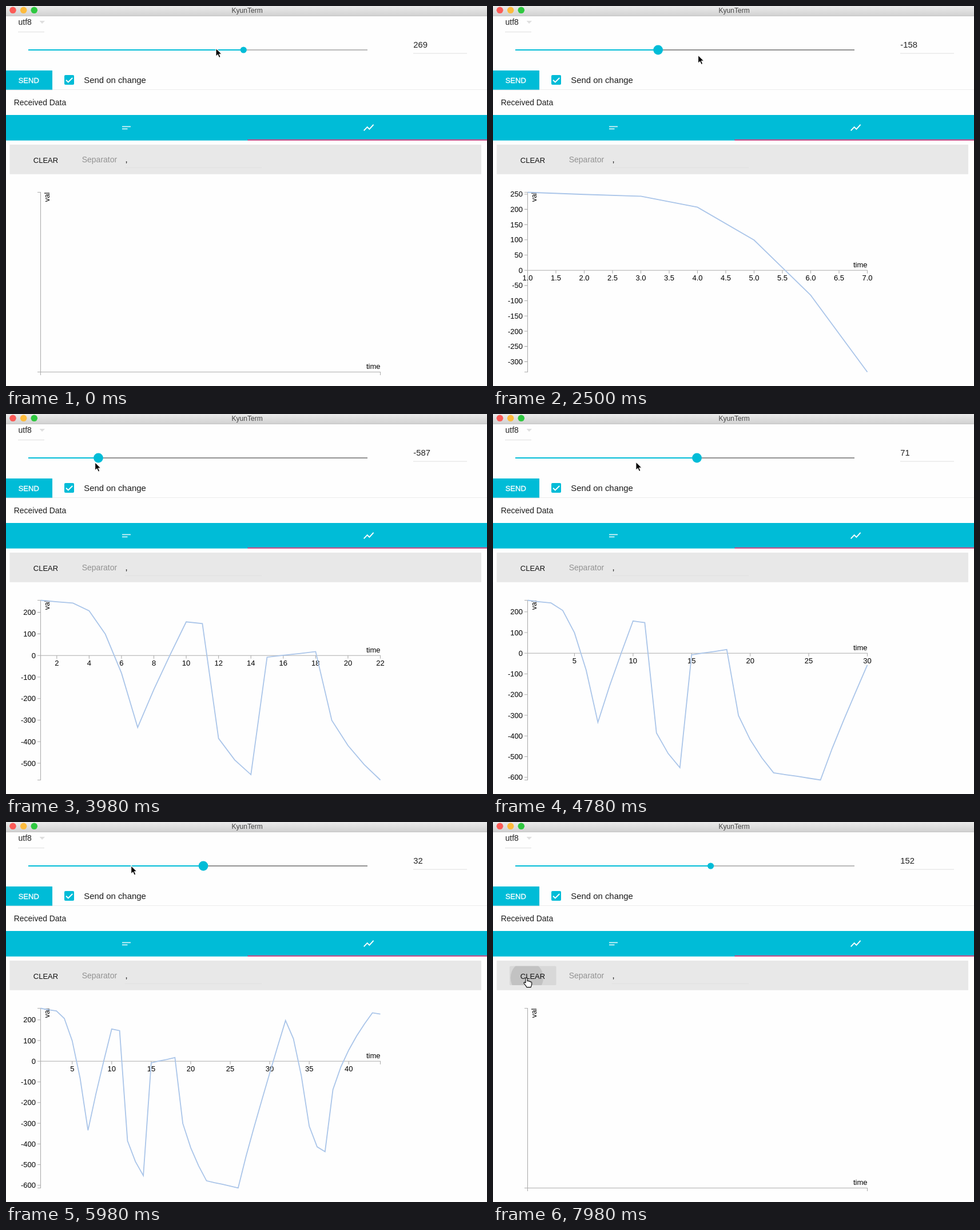
An HTML page that plays this animation: 841 by 666 pixels, repeating every 8000 ms.

```html
<!DOCTYPE html>
<html lang="en">
<head>
<meta charset="utf-8">
<title>Serial plot</title>
<style>
  html, body { margin: 0; width: 100%; height: 100%; overflow: hidden; background: #fefefe; }
  svg { display: block; width: 841px; height: 666px; font-family: "Liberation Sans", Arial, sans-serif; }
  .axis { fill: none; stroke: #adadad; stroke-width: 1.1; }
  .rule { stroke: #dedede; }
  .label { font-size: 13px; fill: #000; }
</style>
</head>
<body>
<svg viewBox="0 0 841 666">
  <defs>
    <linearGradient id="bar" x2="0" y2="1">
      <stop stop-color="#ebebeb"/><stop offset="1" stop-color="#d2d2d2"/>
    </linearGradient>
    <clipPath id="button"><rect x="29" y="252.5" width="81.5" height="33.5" rx="1.5"/></clipPath>
  </defs>
  <rect width="841" height="666" fill="#fefefe"/>

  <rect width="841" height="17" fill="url(#bar)"/>
  <path d="M0 17.3H841" stroke="#bcbcbc"/>
  <circle cx="12" cy="7.3" r="5.8" fill="#fc5b57"/>
  <circle cx="30.7" cy="7.3" r="5.8" fill="#fdbb3c"/>
  <circle cx="49.3" cy="7.3" r="5.8" fill="#2fc840"/>
  <text x="421.7" y="12" font-size="12.1" fill="#444" text-anchor="middle">KyunTerm</text>

  <text x="21.5" y="32.7" font-size="14" fill="#222">utf8</text>
  <path d="M58.5 26H68L63.2 31Z" fill="#dedede"/>
  <path class="rule" d="M21 45.5H67M712 83H806"/>
  <path id="track" d="M39 77H632" stroke-width="1.9"/>
  <path id="fill" stroke="#00bcd7" stroke-width="2"/>
  <circle id="knob" cy="77" fill="#00bcd7"/>
  <text id="value" x="712.3" y="73.4" font-size="14.8" fill="#222"></text>

  <path d="M81 146.5H841" stroke="#ececec"/>
  <rect y="114" width="81.3" height="33.8" fill="#000" opacity=".08"/>
  <rect y="113" width="81" height="33.7" fill="#00bcd7"/>
  <text x="21.7" y="134.5" font-size="13" fill="#fff" stroke="#fff" stroke-width=".35">SEND</text>
  <rect x="102" y="121" width="17" height="17" rx="2" fill="#00bcd7"/>
  <path d="M105 129.8L108.8 133.5L116.3 126" fill="none" stroke="#fff" stroke-width="1.9"/>
  <text x="136.3" y="134.6" font-size="14.9" fill="#1c1c1c">Send on change</text>
  <text x="13.8" y="173.5" font-size="13.95" fill="#1c1c1c">Received Data</text>

  <rect y="191" width="841" height="44.7" fill="#00bcd7"/>
  <rect x="422.5" y="233.8" width="418.5" height="1.9" fill="#e2417f"/>
  <path d="M203 211.4H218M203 215.4H212.5" stroke="#d4f3f8" stroke-width="1.8"/>
  <path d="M625.7 218.3L631.7 212.2L635.4 215.9L642.6 207.8" fill="none" stroke="#fff" stroke-width="1.9"/>

  <rect x="6.5" y="243" width="824.5" height="51.7" fill="#e8e8e8"/>
  <g id="press" clip-path="url(#button)">
    <rect x="29" y="252" width="82" height="35" fill="#d8d8d8"/>
    <circle cx="59.3" cy="273" r="28.7" fill="#c2c2c2"/>
  </g>
  <text x="47.8" y="274.6" font-size="13" fill="#111">CLEAR</text>
  <text x="132.7" y="273.6" font-size="14" fill="#929292">Separator</text>
  <text x="208.5" y="273.6" font-size="14.8" fill="#111">,</text>
  <path d="M208 283.3H447" stroke="#e0e0e0"/>

  <path id="yAxis" class="axis"/>
  <path id="xAxis" class="axis"/>
  <g id="labels" class="label"></g>
  <text class="label" text-anchor="end" transform="translate(75.7 326.5) rotate(-90)">val</text>
  <text id="time" class="label" x="654.5" text-anchor="end">time</text>
  <path id="line" fill="none" stroke="#aac5e9" stroke-width="1.8"/>

  <path id="arrow" d="M0 0V14.3L3.3 11.3L5.6 16.6L8.2 15.5L5.9 10.3H10.4Z" fill="#000" stroke="#fff" stroke-width="1.1"/>
  <path id="hand" fill="#fff" stroke="#000" stroke-width="1.1" stroke-linejoin="round"
    d="M-1.5 1.2C-1.5 -.6 1.4 -.6 1.5 1.2V6C2.5 4.8 4.3 5.2 4.4 6.5C5.6 5.6 7 6.2 7 7.4C8.2 6.8 9.2 7.5 9.2 8.6V11.5C9.2 13.5 8 14.5 7.7 16.6H.4C0 14.8 -2.2 13 -4.3 9.8C-5.2 8.2 -3.3 7 -1.5 9Z"/>
</svg>
<script>
const LOOP = 8000, BEAT = 158, ANCHOR = 2500;
const GRAB = ANCHOR - 5 * BEAT, REST = ANCHOR + 31 * BEAT, RELEASE = REST + BEAT, HOVER = RELEASE + BEAT, CLEAR = 7980;
const LEFT = 60.5, RIGHT = 654.5, TOP = 326.5, BOTTOM = 641.5;
const $ = id => document.getElementById(id);
const set = (id, attrs) => { for (const k in attrs) $(id).setAttribute(k, attrs[k]); };
const show = (id, on) => set(id, { display: on ? "inline" : "none" });
const mix = (a, b, u) => a + (b - a) * u;

// The knob's swings: sample number at the end of each, value reached, easing power.
const swings = [[0, 269], [3, 243, .65], [7, -334, 2], [10, 156, .93], [11, 148], [14, -553, .25],
  [15, -8], [18, 18], [22, -578, .45], [26, -613], [32, 197, .93], [35, -314, 1.6], [37, -437, .3],
  [43, 234, .45], [47, -272, 3.2], [49, -397, .35], [55, 263, .6], [60, 152, 1.9]];

// Samples received by a given beat, counted from the anchor.
const received = [[-5, 0], [-4, 1], [0, 7], [9, 22], [14, 30], [22, 44.4], [28, 56], [31, 60]];
const pointerLead = [[0, 2.5], [14, 4.9], [28, 4]];
const pointerY = [[-5, 78], [0, 86], [14, 84], [22, 76.5], [28, 84], [31, 79]];
const approach = [[0, 367, 74], [450, 271, 67], [900, 280, 68], [1550, 413, 78]];
const leave = [[REST, 380, 79], [HOVER, 58.5, 273]];

function track(keys, at, column = 1) {
  const i = keys.findIndex(k => k[0] >= at);
  if (i < 1) return keys.at(i)[column];
  const a = keys[i - 1], b = keys[i];
  return mix(a[column], b[column], (at - a[0]) / (b[0] - a[0]));
}

function valueAt(index) {
  const i = swings.findIndex(s => s[0] >= index);
  if (i < 1) return swings.at(i)[1];
  const [from, a] = swings[i - 1], [to, b, power = 1] = swings[i];
  return mix(a, b, ((index - from) / (to - from)) ** power);
}

const samples = Array.from({ length: 61 }, (_, i) => Math.round(valueAt(i)));
const sliderX = v => 39 + (v + 1000) / 2000 * 593;

function ticks(min, max) {
  const span = max - min;
  if (!span) return [];
  let step = 10 ** Math.floor(Math.log10(span / 10));
  const err = step * 10 / span;
  step *= err <= .15 ? 10 : err <= .35 ? 5 : err <= .75 ? 2 : 1;
  const digits = Math.max(0, -Math.floor(Math.log10(step) + .01)), out = [];
  for (let i = Math.ceil(min / step); i * step <= max + 1e-9; i++)
    out.push([i * step, (i * step).toFixed(digits)]);
  return out;
}

function drawChart(n) {
  const data = samples.slice(1, n + 1);
  const min = n ? Math.min(...data) : 0, max = n ? Math.max(...data) : 0;
  const x = i => mix(LEFT, RIGHT, (i - 1) / (n - 1 || 1));
  const y = v => mix(BOTTOM, TOP, (v - min) / (max - min || 1));
  const base = n > 1 ? Math.min(y(0), BOTTOM) : BOTTOM;
  let yPath = `M55 ${TOP}H${LEFT}V${BOTTOM}H55`;
  let xPath = `M${LEFT} ${base + 5.5}V${base}H${RIGHT}V${base + 5.5}`;
  let text = "";
  const yTicks = n === 1 ? [[min, String(min)]] : ticks(min, max);
  for (const [v, label] of yTicks) {
    yPath += `M55 ${y(v)}H${LEFT}`;
    text += `<text x="52" y="${y(v) + 4.6}" text-anchor="end">${label}</text>`;
  }
  for (const [v, label] of n > 1 ? ticks(1, n) : []) {
    xPath += `M${x(v)} ${base}v5.5`;
    text += `<text x="${x(v)}" y="${base + 18}" text-anchor="middle">${label}</text>`;
  }
  set("yAxis", { d: yPath });
  set("xAxis", { d: xPath });
  set("time", { y: base - 5.2 });
  set("line", { d: n > 1 ? "M" + data.map((v, i) => `${x(i + 1)} ${y(v)}`).join("L") : "M0 0" });
  $("labels").innerHTML = text;
}

function pointer(t, beat, count) {
  if (t < GRAB) return [track(approach, t), track(approach, t, 2)];
  if (t >= REST) return [track(leave, t), track(leave, t, 2)];
  return [sliderX(valueAt(count + track(pointerLead, beat))) - .5, track(pointerY, beat)];
}

function render(beat, cleared) {
  const t = ANCHOR + beat * BEAT;
  const dragging = t >= GRAB && t < RELEASE;
  const count = track(received, beat);
  // The slider is always ahead of the plotted echo.
  const sent = t < GRAB ? 0 : Math.min(Math.ceil(count + 1), samples.length - 1);
  const knobX = sliderX(samples[sent]);
  drawChart(cleared ? 0 : Math.round(count));
  set("track", { stroke: dragging ? "#929292" : "#b9b9b9" });
  set("fill", { d: `M39 77H${knobX}` });
  set("knob", { cx: knobX, r: dragging ? 8.4 : 5.6 });
  $("value").textContent = samples[sent];
  show("press", cleared);
  const hovering = t >= HOVER;
  show("arrow", !hovering);
  show("hand", hovering);
  set(hovering ? "hand" : "arrow", { transform: `translate(${pointer(t, beat, count)})` });
}

function frame() {
  const t = performance.now() % LOOP;
  render(Math.floor((t - ANCHOR) / BEAT), t >= CLEAR);
  requestAnimationFrame(frame);
}
frame();
</script>
</body>
</html>
```
